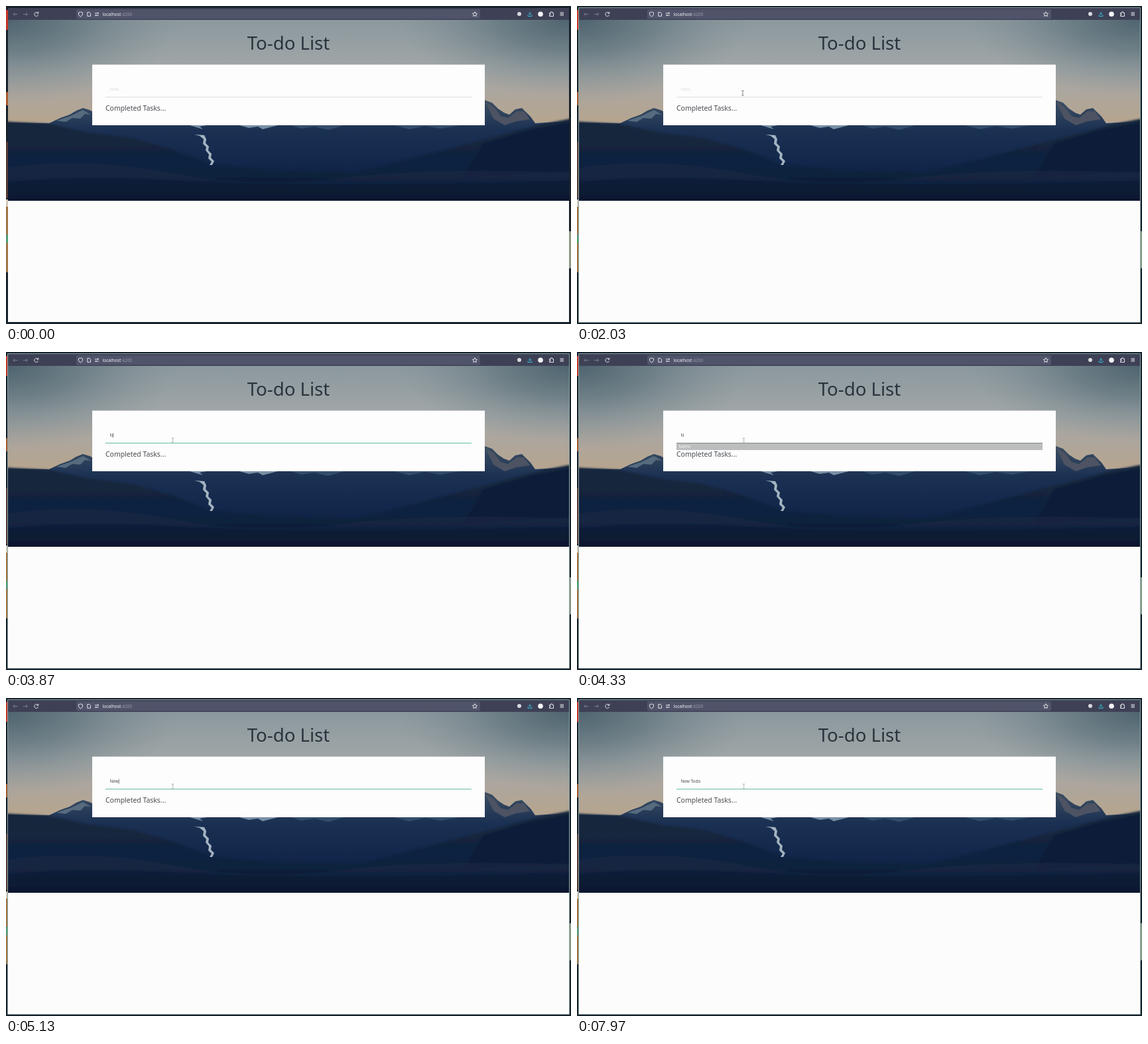
Animation, 852 px wide and 480 px high, one loop 8 s. Source, as an HTML page:

```html
<!DOCTYPE html>
<html lang="en">
<head>
<meta charset="utf-8">
<title>To-do List</title>
<style>
  html, body { margin: 0; width: 100%; height: 100%; overflow: hidden; background: #18222b; }
  svg { display: block; width: 100vw; height: 100vh; font-family: "Noto Sans", "Open Sans", sans-serif; }
  .icon { fill: none; stroke: #e2e3e8; stroke-width: 1; }
  .dim { stroke: #777b8a; }
  .frame, .pointer, .beam, .line, .popup { animation: 8s infinite; }
  .frame { animation-name: frame; animation-timing-function: step-end; }
  .pointer { animation-name: pointer; }
  .beam { animation-name: beam; animation-timing-function: step-end; }
  .line { animation-name: line; }
  .popup { animation-name: popup; animation-timing-function: step-end; }

  @keyframes frame { 0% { opacity: 0; } 5.5%, 100% { opacity: 1; } }
  @keyframes pointer {
    0%, 5.4% { transform: translate(2px, 190px); opacity: 0; animation-timing-function: ease-out; }
    5.5% { transform: translate(2px, 190px); opacity: 1; animation-timing-function: ease-out; }
    12%, 23% { transform: translate(244px, 123.5px); opacity: 1; }
    28%, 100% { transform: translate(251.5px, 133.5px); opacity: 1; }
  }
  @keyframes beam { 0% { stroke: #70757b; } 30%, 100% { stroke: #a3a5a5; } }
  @keyframes line {
    0%, 30% { stroke: #dedede; }
    33.5%, 100% { stroke: #62bda6; }
  }
  @keyframes popup { 0% { opacity: 0; } 52.6% { opacity: 1; } 58%, 100% { opacity: 0; } }
</style>
</head>
<body>
<svg viewBox="0 0 852 480" preserveAspectRatio="none">
  <defs>
    <linearGradient id="sky" x1="0" y1="0" x2="0" y2="1">
      <stop offset="0" stop-color="#8b989e"/>
      <stop offset=".25" stop-color="#a0a6a7"/>
      <stop offset=".4" stop-color="#aca69e"/>
      <stop offset=".55" stop-color="#b5a590"/>
    </linearGradient>
    <radialGradient id="corner">
      <stop offset="0" stop-color="#4e646f"/>
      <stop offset=".4" stop-color="#5d717a" stop-opacity=".7"/>
      <stop offset="1" stop-color="#7c8b91" stop-opacity="0"/>
    </radialGradient>
    <linearGradient id="valley" x1="0" y1="0" x2="0" y2="1">
      <stop offset="0" stop-color="#3d4f63"/>
      <stop offset=".3" stop-color="#1b3153"/>
      <stop offset=".65" stop-color="#11264a"/>
      <stop offset="1" stop-color="#0b1a33"/>
    </linearGradient>
    <linearGradient id="hill" x1="0" y1="0" x2="0" y2="1">
      <stop offset="0" stop-color="#14263c"/>
      <stop offset=".55" stop-color="#10233f"/>
      <stop offset="1" stop-color="#08152a"/>
    </linearGradient>
    <filter id="soft"><feGaussianBlur stdDeviation="1.5"/></filter>
    <filter id="slight"><feGaussianBlur stdDeviation=".6"/></filter>
    <clipPath id="photo"><path d="M3 21H849V294H3Z"/></clipPath>
  </defs>

  <!-- desktop edges -->
  <path d="M0 0H852V480H0Z" fill="#18222b"/>
  <path d="M0 6H3V36H0Z" fill="#c53528"/>
  <path d="M0 130H3V150H0Z" fill="#a85a2e"/>
  <path d="M0 205H3V290H0Z" fill="#573b32"/>
  <path d="M0 292H3V303H0Z" fill="#d5cabb"/>
  <path d="M0 303H3V402H0Z" fill="#a17443"/>
  <path d="M0 345H3V358H0Z" fill="#4f9c73"/>
  <path d="M849 340H852V396H849Z" fill="#8a9a86"/>

  <!-- landscape -->
  <g clip-path="url(#photo)">
    <path d="M3 21H849V294H3Z" fill="url(#sky)"/>
    <ellipse cx="3" cy="21" rx="260" ry="125" fill="url(#corner)"/>
    <ellipse cx="849" cy="21" rx="260" ry="115" fill="url(#corner)"/>
    <g filter="url(#slight)">
      <path d="M3 176 65 177 82 169 96 164 106 158 116 154 126 157 140 164 300 155 650 155 710 143 722 142 733 146 742 155 751 161 759 164 768 156 778 154 784 160 791 167 798 177 849 174V294H3Z" fill="url(#valley)"/>
      <path d="M76 173 97 166 116 157 128 164 119 163 112 170 100 169 90 175Z" fill="#566b7e"/>
      <path d="M723 145 736 153 746 166 757 169 770 159 781 159 790 171 770 174 752 180 735 170Z" fill="#4d5362"/>
      <path d="M277 180 297 186 292 182 303 180Z M352 180 366 184 380 182 387 186 410 180Z" fill="#7890a5"/>
      <path d="M430 180 445 185 465 182 486 187 510 180Z M585 180 608 186 632 181 655 185 685 180Z" fill="#344d6c"/>
    </g>
    <g filter="url(#soft)">
      <path d="M-5 174 65 178 125 191 190 199 250 216 310 239 420 249 530 251 620 228 700 207 760 191 806 179 857 169V304H-5Z" fill="url(#hill)"/>
      <path d="M720 207 790 187 857 174V250L690 258Z" fill="#0e1f38"/>
      <path d="M3 244Q120 228 250 252T500 260T849 251V264Q650 269 500 269T230 262T3 266Z" fill="#162b48" opacity=".5"/>
    </g>
    <path d="M284 194 299 195 302 201 301 207 306 212 305 218 310 223 309 229 314 234 311 240 307 240 310 235 305 230 306 224 301 218 302 213 297 208 298 201 292 196Z" fill="#a3b3c0" filter="url(#slight)"/>
  </g>

  <!-- browser bar -->
  <path d="M3 3H849V21H3Z" fill="#3e4156"/>
  <rect x="106" y="5" width="609" height="14.5" rx="2" fill="#50546a"/>
  <g class="icon dim">
    <path d="M17.5 12.5H11M13.5 10 11 12.5 13.5 15M26 12.5H32.5M30 10 32.5 12.5 30 15"/>
  </g>
  <g class="icon">
    <path d="M48 10.4A3 3 0 1 0 48.6 13.5M48.8 8.8V11.2H46.2"/>
    <path d="M112.5 9 115.5 10V12.5Q115 15 112.5 16 110 15 109.5 12.5V10Z"/>
    <path d="M122.8 9.5H125.8L127.5 11.2V15.3H122.8Z"/>
    <path d="M134 10.8H140M138.5 9.5V12M134 14H140M135.8 12.7V15.2"/>
    <path d="M707 8.7 708.1 11 710.6 11.3 708.8 13 709.2 15.5 707 14.3 704.8 15.5 705.2 13 703.4 11.3 705.9 11Z"/>
    <path d="M819.5 10.5H821.5V9H824V10.5H825.5V15.5H819.5V13.5H821V12H819.5Z"/>
    <path d="M835.5 10H841M835.5 12H841M835.5 14H841"/>
    <path d="M790 9V13M788 11.2 790 13.2 792 11.2M787 13.5V15.4H793V13.5" stroke="#38bdd6"/>
  </g>
  <circle cx="774" cy="12" r="3" fill="#d8d9de"/>
  <circle cx="806" cy="12.2" r="3.8" fill="#f4f4f6"/>
  <text x="145.5" y="14.8" font-size="6.6" fill="#f2f2f5">localhost<tspan fill="#9699a6">:4200</tspan></text>

  <!-- page -->
  <path d="M3 294H849V477H3Z" fill="#fcfcfc"/>
  <text x="426" y="66" font-size="27.6" text-anchor="middle" fill="#28333c">To-do List</text>
  <path d="M130 88.5H722V180H130Z" fill="#fdfdfd"/>
  <path class="line" d="M150 137.5H702" stroke-width="1"/>
  <text id="hint" x="156.5" y="128.4" font-size="6.4" fill="#dedede">New...</text>
  <text id="entry" x="156.5" y="128.4" font-size="6.4" fill="#4c4f52">New</text>
  <path id="caret" d="M0 122.5V129.5" stroke="#55585c" stroke-width=".7"/>
  <text x="150" y="158" font-size="10.45" fill="#484b50">Completed Tasks...</text>
  <g class="popup">
    <path d="M150 137H702V148H150Z" fill="#bcbdbe"/>
    <path d="M150 137.5H702" stroke="#7c8b88"/>
    <text x="153.5" y="145" font-size="6.2" fill="#f7f7f7">Name</text>
  </g>

  <path class="frame" d="M2.5 2.5H849.5V477.5H2.5Z" fill="none" stroke="#86a3a2"/>
  <g class="pointer">
    <path class="beam" d="M-1.7-3.5H1.7M0-3.5V3.5M-1.7 3.5H1.7" fill="none" stroke-width=".9"/>
  </g>
</svg>
<script>
  const LOOP = 8000, FOCUS = 2400, START_X = 156.5;
  const MESSAGE = "New Todo";
  const KEY_TIMES = [3800, 4640, 4850, 5350, 5600, 5820, 6050, 7300];
  const [hint, entry, caret] = ["hint", "entry", "caret"].map(id => document.getElementById(id));
  entry.style.whiteSpace = "pre";

  function draw() {
    const t = performance.now() % LOOP;
    const count = KEY_TIMES.filter(time => time <= t).length;
    const typed = MESSAGE.slice(0, count);
    if (entry.textContent !== typed) entry.textContent = typed;
    hint.style.opacity = count ? 0 : 1;

    // The caret blink restarts with each key.
    const since = t - (count ? KEY_TIMES[count - 1] : FOCUS);
    const visible = since >= 0 && since % 1000 < 500;
    const x = START_X + (count ? entry.getComputedTextLength() : 0) + 0.4;
    caret.setAttribute("transform", `translate(${x})`);
    caret.style.opacity = visible ? 1 : 0;
    requestAnimationFrame(draw);
  }
  draw();
</script>
</body>
</html>
```
